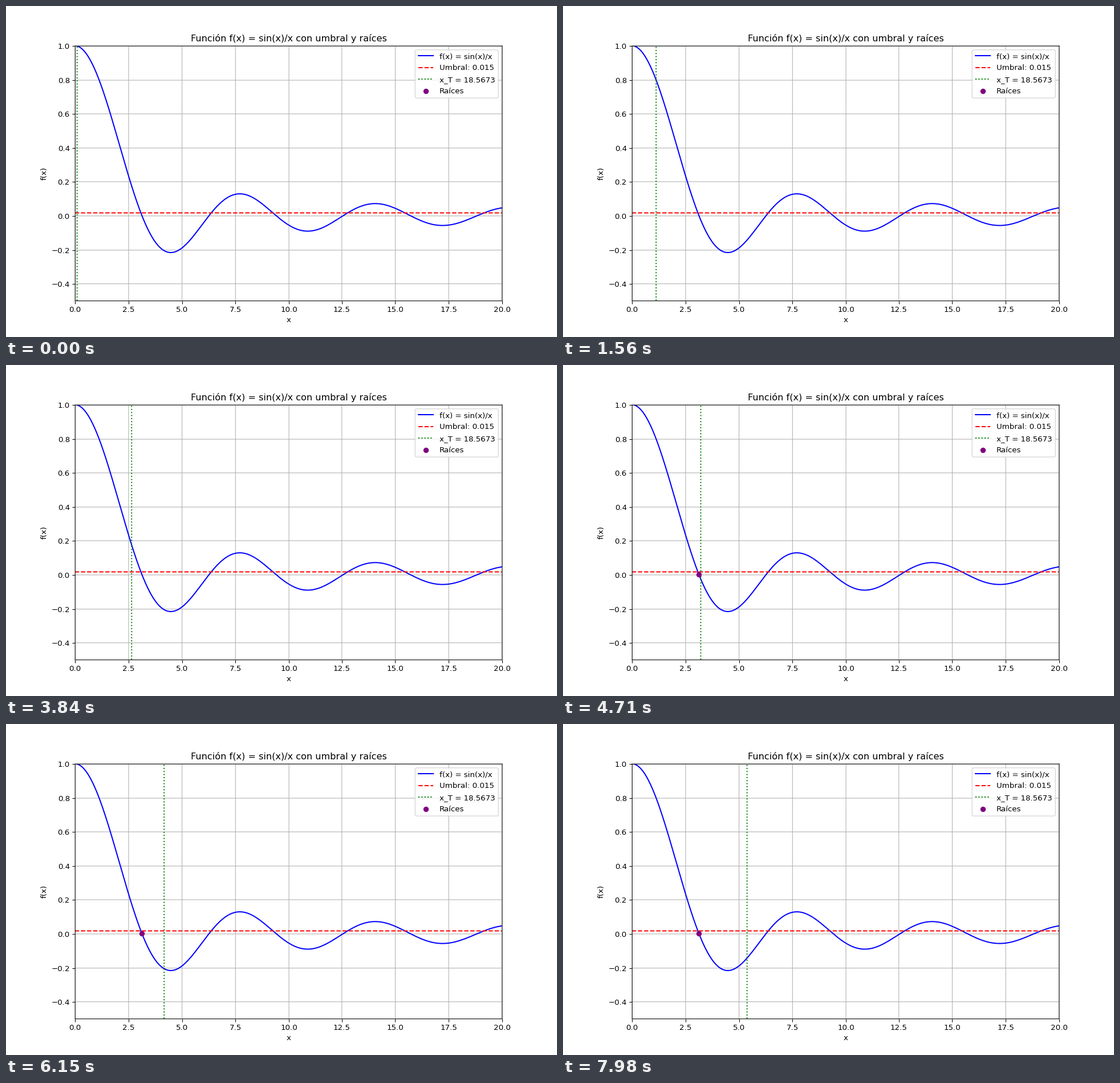
Recreate the animation shown at these times as a matplotlib script. Size 966 by 580 pixels, loop 8 s.

```python
import numpy as np
import matplotlib.pyplot as plt
from matplotlib.animation import FuncAnimation

WIDTH, HEIGHT, DPI = 966, 580, 96.6
LOOP, INTERVAL, STEP = 8000, 20, 30      # milliseconds
THRESHOLD, X_T, X_MAX = 0.015, 18.5673, 20
Y_MIN, Y_MAX = -0.5, 1

# Straight lines sit on a 1000 x 600 layout grid, rows counted from the top.
COLS, ROWS = 1000, 600
LEFT, TOP, BOX_W, BOX_H = 125, 72, 775, 462
X_UNIT, Y_UNIT = BOX_W / X_MAX, BOX_H / (Y_MAX - Y_MIN)

plt.rcParams["font.family"] = "DejaVu Sans"

x = np.linspace(0.1, X_MAX, 1000)
roots = np.pi * np.arange(1, 7)


def col_to_x(col):
    return (col - LEFT) / X_UNIT


def row_to_y(row):
    return Y_MAX - (row - TOP) / Y_UNIT


def snap_x(value, shift=0.0):
    """Move a data x to the nearest grid column; thin lines shift by half."""
    return col_to_x(np.floor(LEFT + value * X_UNIT + 0.5) + shift)


def snap_y(value, shift=0.0):
    return row_to_y(np.floor(TOP + (Y_MAX - value) * Y_UNIT + 0.5) + shift)


def tick_labels(values):
    return [f"{v:.1f}".replace("-", "\u2212") for v in values]


# the tiny margin keeps float rounding from losing a pixel
fig = plt.figure(
    figsize=((WIDTH + 0.001) / DPI, (HEIGHT + 0.001) / DPI), dpi=DPI)
left, bottom = LEFT + 0.5, ROWS - TOP - BOX_H - 0.5
ax = fig.add_axes([left / COLS, bottom / ROWS, BOX_W / COLS, BOX_H / ROWS])

ax.plot(x, np.sin(x) / x, color="blue", label="f(x) = sin(x)/x")
limit, = ax.plot([0, X_MAX], [snap_y(THRESHOLD)] * 2, color="red",
                 linestyle="--", label=f"Umbral: {THRESHOLD}")
sweep, = ax.plot([snap_x(x[0])] * 2, [Y_MIN, Y_MAX], color="green",
                 linestyle=":", label=f"x_T = {X_T}")
dots = ax.scatter([], [], color="purple", zorder=5, label="Raíces")

x_ticks = np.arange(9) * 2.5
y_ticks = np.arange(-2, 6) * 0.2
ax.set_xticks(snap_x(x_ticks, 0.5), labels=tick_labels(x_ticks))
ax.set_yticks(snap_y(y_ticks, 0.5), labels=tick_labels(y_ticks))
ax.set_xlim(col_to_x(left), col_to_x(left + BOX_W))
ax.set_ylim(row_to_y(TOP + BOX_H + 0.5), row_to_y(TOP + 0.5))
ax.set_xlabel("x")
ax.set_ylabel("f(x)")
ax.set_title("Función f(x) = sin(x)/x con umbral y raíces")
ax.grid(True)
legend = ax.legend(loc="upper right", labelspacing=0.54)

for artist in (limit, sweep, legend.get_frame(), *ax.spines.values(),
               *ax.get_xgridlines(), *ax.get_ygridlines()):
    artist.set_snap(False)


def update(frame):
    pos = x[(frame * INTERVAL + INTERVAL // 2) // STEP]
    sweep.set_xdata([snap_x(pos)] * 2)
    found = roots[roots <= pos]
    dots.set_offsets(np.column_stack([found, np.zeros_like(found)]))
    return sweep, dots


def init():
    return update(0)


anim = FuncAnimation(fig, update, frames=LOOP // INTERVAL, init_func=init,
                     interval=INTERVAL, repeat=True, repeat_delay=0)
plt.show()
```
